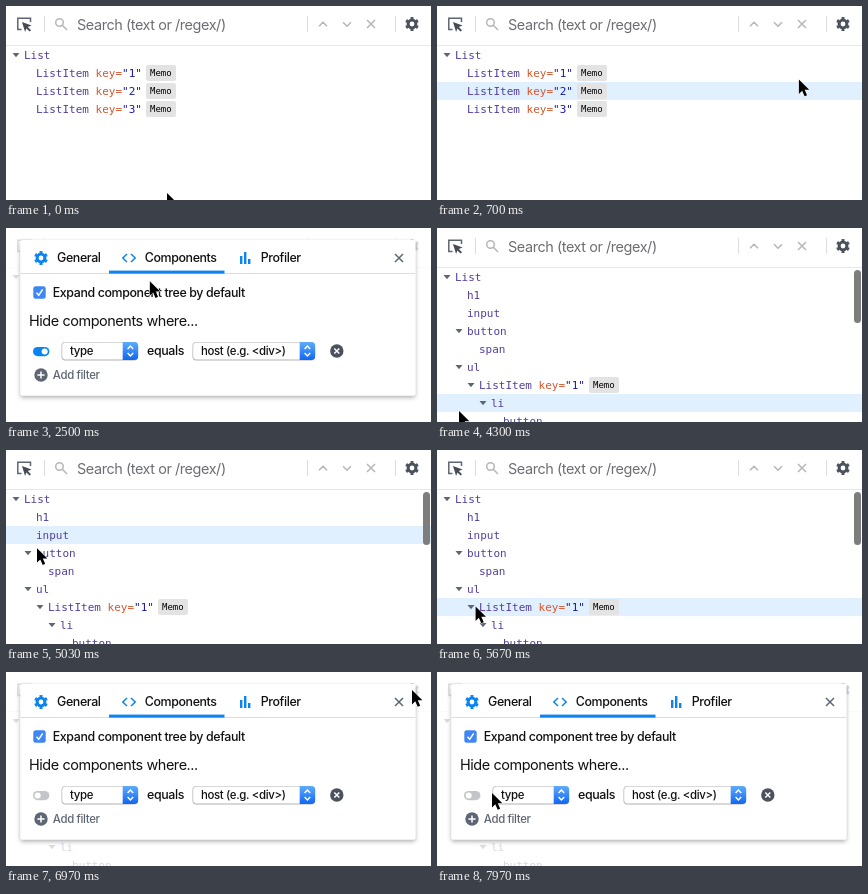
Recreate the animation shown at these times as an HTML page. Size 425 by 194 pixels, loop 8000 ms.

```html
<!DOCTYPE html>
<html lang="en">
<head>
<meta charset="utf-8">
<title>Component tree settings</title>
<style>
  html, body { margin: 0; width: 100%; height: 100%; overflow: hidden; background: #fff; }
  svg { display: block; width: 100%; height: 100%; }
  text { font: 500 12.4px Inter, Roboto, sans-serif; letter-spacing: -.03em; fill: #111; white-space: pre; }
  .large { font-size: 14.45px; font-weight: 400; }
  .small { font-size: 11.4px; }
  .mono { font: 11px "DejaVu Sans Mono", monospace; letter-spacing: 0; fill: #523e9e; }
  .mono .attr { fill: #d6562b; }
  .mono .value { fill: #1a1aa6; }
  .mono.badge { font-size: 9px; fill: #000; }
  .line { fill: none; stroke-width: 1.5; }
  .blue { fill: #0a84f0; }
  .hover { fill: #e0f0fe; }
  .divider { stroke: #ddd; }
</style>
</head>
<body>
<svg viewBox="0 0 425 194" preserveAspectRatio="none">
  <defs>
    <linearGradient id="button" x2="0" y2="1">
      <stop stop-color="#5fabfb"/><stop offset="1" stop-color="#1167f2"/>
    </linearGradient>
    <filter id="shadow" x="-5%" y="-10%" width="110%" height="120%">
      <feDropShadow dx="0" dy="2" stdDeviation="2.2" flood-opacity=".32"/>
    </filter>
    <g id="gear" fill="none" stroke="currentColor">
      <circle r="3.9" stroke-width="3"/>
      <circle r="5.8" stroke-width="2.2" pathLength="12" stroke-dasharray="1 1" stroke-dashoffset="-.5"/>
    </g>
    <g id="check">
      <rect x="-6.2" y="-6.2" width="12.4" height="12.4" rx="2.5" fill="#3f86f5"/>
      <path d="M-3 .3L-.8 2.8 3.2-3.2" class="line" stroke="#fff" stroke-width="1.7"/>
    </g>
    <path id="cross" d="M-4-4L4 4M4-4L-4 4" class="line"/>
  </defs>

  <rect width="425" height="194" fill="#fff"/>
  <rect id="hover" class="hover" width="425" height="18"/>
  <g id="shortTree"></g>
  <g id="fullTree"></g>
  <rect id="scrollbar" x="417" y="42" width="7" height="53" rx="3.5" fill="#7d7d7d"/>

  <g id="toolbar">
    <path d="M0 39.5H425" stroke="#e8e8e8"/>
    <path d="M38.5 10V26M301.5 10V26M389.5 10V26" class="divider"/>
    <path d="M15.5 23.5H11.8V12.3H24.5V16" class="line" stroke="#5f6673"/>
    <path d="M16 16l9.5 3.6-3.7 1.4 3.2 3.2-1.4 1.4-3.2-3.2-1.3 3.6z" fill="#464c57"/>
    <g class="line" stroke="#b4b6ba">
      <circle cx="53.5" cy="16.5" r="3.8"/><path d="M56.3 19.3L61 24"/>
      <path d="M313 20.2l4-4 4 4M337 16.2l4 4 4-4"/>
      <use href="#cross" x="365" y="18"/>
    </g>
    <text x="71" y="23.6" class="large" style="fill:#6c6e73">Search (text or /regex/)</text>
    <use href="#gear" x="406" y="18" color="#4c525d"/>
  </g>

  <g id="modal">
    <rect width="425" height="194" fill="#fff" opacity=".78"/>
    <rect id="card" x="14.4" y="12" width="395" rx="2" fill="#fff" filter="url(#shadow)"/>
    <path d="M14.4 45.5H409.4" class="divider"/>
    <rect id="underline" class="blue" y="42.6" height="3"/>
    <use href="#gear" x="35" y="30" color="#0a84f0"/>
    <path d="M121 26l-4.2 4 4.2 4M125 26l4.2 4-4.2 4" class="line" stroke="#0a84f0"/>
    <path d="M234 28h2.4v8H234zM238 24h2.4v12H238zM242 31h2.4v5H242z" class="blue"/>
    <text x="51" y="34.3">General</text>
    <text x="138.7" y="34.3">Components</text>
    <text x="254.7" y="34.3">Profiler</text>
    <use href="#cross" x="393" y="30" stroke="#5f6673"/>

    <g id="general">
      <text x="23" y="68.3">Theme</text>
      <text x="23" y="96.3">Display density</text>
      <use href="#check" x="33.5" y="119.5"/>
      <text x="47" y="124.1">Append component stacks to console warnings and errors.</text>
      <rect class="hover" x="23" y="137" width="378" height="25.5" rx="2"/>
      <text x="31" y="154.3"><tspan class="blue" text-decoration="underline">View release notes</tspan> for DevTools version 4.0.0-baac1dc</text>
    </g>

    <g id="components">
      <use href="#check" x="33.5" y="64.5"/>
      <text x="46.7" y="69.1">Expand component tree by default</text>
      <text x="23" y="98" class="large">Hide components where...</text>
      <rect id="toggle" x="27" y="119" width="16.4" height="9.2" rx="4.6"/>
      <circle id="knob" cy="123.6" r="3" fill="#fff"/>
      <text x="141" y="127.1">equals</text>
      <circle cx="330.8" cy="123" r="6.7" fill="#4c525d"/>
      <path d="M328.3 120.5l5 5m0-5l-5 5" class="line" stroke="#fff"/>
      <circle cx="35" cy="147" r="6.7" fill="#5f6673"/>
      <path d="M31.4 147h7.2M35 143.4v7.2" class="line" stroke="#fff"/>
      <text x="46.8" y="151.2" class="small" style="fill:#5f6673">Add filter</text>
    </g>
  </g>

  <path id="cursor" d="M1 0V14.4l3.3-3.1 2.4 5.5 2.5-1.1-2.4-5.4h4.6z" stroke="#fff" stroke-width="1" paint-order="stroke"/>
</svg>
<script>
const LOOP = 8000, ROW = 18, TOP = 40, HOVER_LAG = 50;
const $ = id => document.getElementById(id);
const show = (id, on) => { $(id).style.display = on ? '' : 'none'; };

// Rows are [depth, name, has children, key]
const items = [1, 2, 3].map(key => [1, 'ListItem', false, key]);
const shortRows = [[0, 'List', true], ...items];
const fullRows = [
  [0, 'List', true], [1, 'h1'], [1, 'input'], [1, 'button', true], [2, 'span'],
  [1, 'ul', true], [2, 'ListItem', true, 1], [3, 'li', true], [4, 'button']
];

function drawTree(id, rows) {
  $(id).innerHTML = rows.map(([depth, name, open, key], i) => {
    const x = 18 + depth * 12, y = TOP + i * ROW + 9;
    const arrow = open ? `<path d="M${x - 11.5} ${y - 2}h7l-3.5 4.2z" fill="#5f6673"/>` : '';
    const attr = key ? ` <tspan class="attr">key=</tspan><tspan class="value">"${key}"</tspan>` : '';
    const badge = key ? `<rect x="${x + 110}" y="${y - 8}" width="30" height="16" rx="2" fill="#e3e3e3"/>
      <text x="${x + 114}" y="${y + 3.2}" class="mono badge">Memo</text>` : '';
    return `${arrow}<text x="${x}" y="${y + 4}" class="mono">${name}${attr}</text>${badge}`;
  }).join('');
}

function addSelect(parent, x, y, width, label) {
  const right = x + width;
  $(parent).insertAdjacentHTML('beforeend', `
    <rect x="${x - .5}" y="${y - 9}" width="${width + .5}" height="18.5" rx="4" fill="#b2b2b2"/>
    <rect x="${x + .2}" y="${y - 8.4}" width="${width - .7}" height="17" rx="3.5" fill="#fff"/>
    <path d="M${right - 15.3} ${y - 9}h11.5q4 0 4 4v10q0 4-4 4h-11.5z" fill="url(#button)"/>
    <path d="M${right - 10.4} ${y - 2}l2.8-3 2.8 3m0 4l-2.8 3-2.8-3" class="line" stroke="#fff"/>
    <text x="${x + 8}" y="${y + 4.2}" class="small">${label}</text>`);
}

drawTree('shortTree', shortRows);
drawTree('fullTree', fullRows);
addSelect('general', 71, 64, 60, 'Auto');
addSelect('general', 118, 92, 99, 'Compact');
addSelect('components', 56, 123, 76, 'type');
addSelect('components', 187, 123, 122, 'host (e.g. &lt;div&gt;)');

// Pointer tip: [time, x, y]
const path = [
  [0, 160, 187], [30, 160, 187], [830, 385, 53], [1170, 404, 20], [1330, 404, 20],
  [1470, 407, 25], [2060, 163, 33], [2400, 160, 34], [2500, 143, 53], [3170, 36, 124],
  [3500, 36, 124], [3900, 20, 186], [4050, 20, 186], [4200, 21, 183], [4330, 21, 183],
  [4700, 35, 56], [4800, 36, 56], [5030, 30, 98], [5130, 30, 112], [5170, 30, 115],
  [5470, 34, 158], [5630, 34, 158], [6130, 290, 59], [6430, 399, 27], [6650, 405, 18],
  [7270, 405, 18], [7970, 54, 121], [LOOP, 54, 121]
];

const slope = (i, axis) => {
  const a = path[i], b = path[i + 1];
  return a && b ? (b[axis] - a[axis]) / (b[0] - a[0]) : 0;
};
// Harmonic mean keeps the curve smooth without overshoot
const tangent = (i, axis) => {
  const a = slope(i - 1, axis), b = slope(i, axis);
  return a * b > 0 ? 2 * a * b / (a + b) : 0;
};

function pointer(time) {
  const i = Math.max(0, path.findIndex(p => p[0] > time) - 1);
  const [start] = path[i], span = path[i + 1][0] - start;
  const u = (time - start) / span, v = 1 - u;
  return [1, 2].map(axis =>
    path[i][axis] * v * v * (1 + 2 * u) + path[i + 1][axis] * u * u * (3 - 2 * u)
    + span * u * v * (v * tangent(i, axis) - u * tangent(i + 1, axis)));
}

function render(now) {
  const t = now % LOOP;
  const modal = t >= 1330 && t < 3950 || t >= 6750;
  const full = t >= 3500, general = t < 2100;
  const rows = full ? fullRows : shortRows;

  show('shortTree', !full);
  show('fullTree', full);
  show('scrollbar', full && !modal);
  show('modal', modal);
  show('general', general);
  show('components', !general);
  $('card').setAttribute('height', general ? 159.5 : 155.5);
  $('underline').setAttribute('x', general ? 14.4 : 103);
  $('underline').setAttribute('width', general ? 88.6 : 115.5);

  const filterOn = t < 3270;
  $('toggle').setAttribute('fill', filterOn ? '#0a84f0' : '#c3c5c9');
  $('knob').setAttribute('cx', filterOn ? 38.7 : 31.7);

  const row = Math.floor((pointer(Math.max(0, t - HOVER_LAG))[1] - TOP) / ROW);
  show('hover', !modal && row >= 0 && row < rows.length);
  $('hover').setAttribute('y', TOP + row * ROW);

  const [x, y] = pointer(t);
  $('cursor').setAttribute('transform', `translate(${x.toFixed(2)} ${y.toFixed(2)})`);
  requestAnimationFrame(render);
}
render(performance.now());
</script>
</body>
</html>
```
